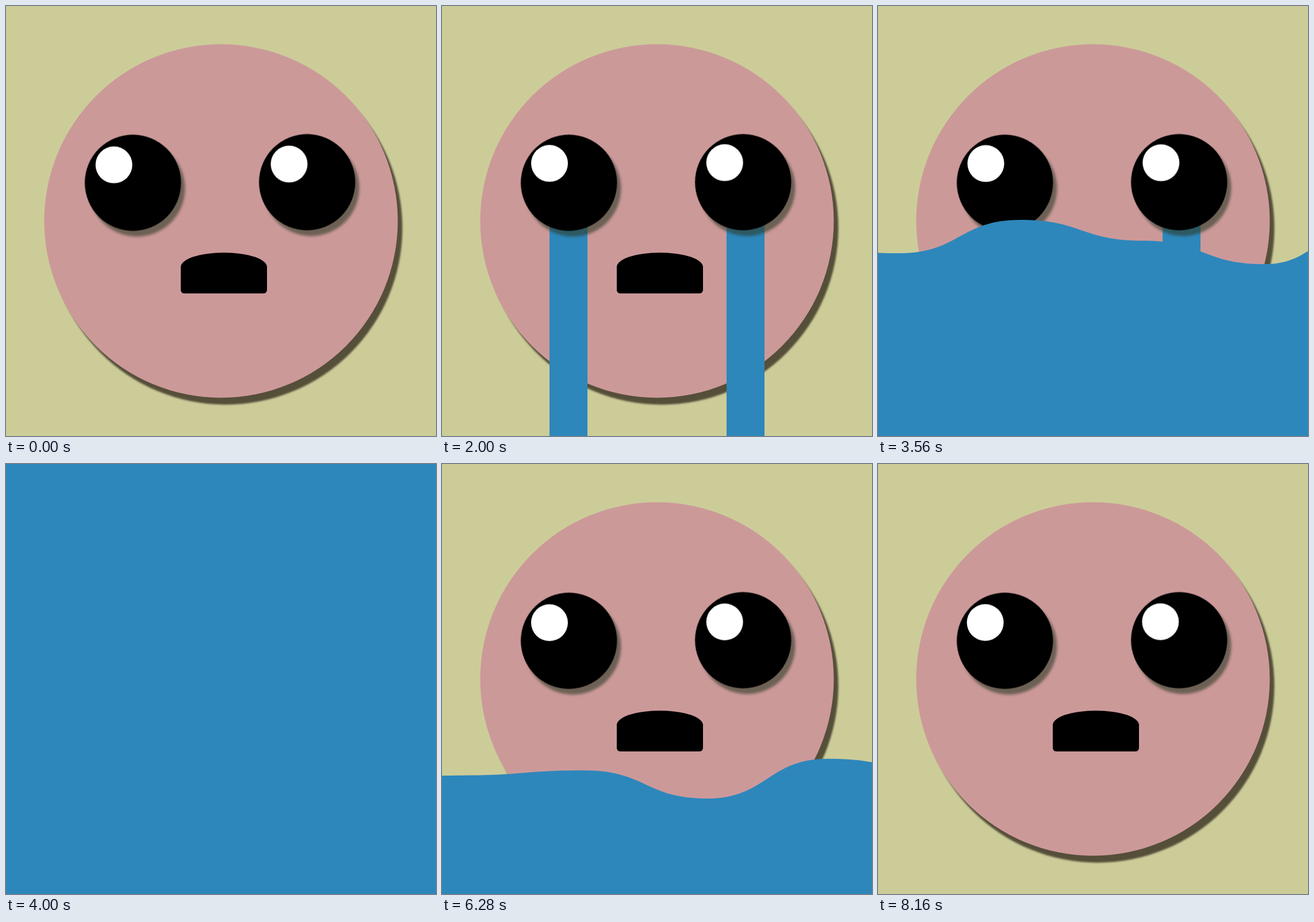
These frames come from a looping animation (748x748 px, 8.2 s). An HTML page:

```html
<!DOCTYPE html>
<html lang="en">
<head>
<meta charset="utf-8">
<title>Flood of tears</title>
<style>
  html, body { margin: 0; width: 100%; height: 100%; overflow: hidden; background: #cc9; }
  svg { display: block; width: 100vw; height: 100vh; }

  .face { fill: #c99; filter: drop-shadow(8px 12.5px 1.8px #554e39); }
  .water, .tear { fill: #2d87bb; }
  .glint { fill: #fff; }

  .ball {
    filter: drop-shadow(7px 10.5px 2.2px rgba(45, 58, 38, .6));
    animation: blink 8200ms infinite;
  }
  .lid { animation: hide 8200ms infinite; }
  .glint {
    animation:
      sway calc(8200ms / 46) cubic-bezier(.364, 0, .636, 1) -80ms infinite alternate,
      bob calc(8200ms / 22) cubic-bezier(.364, 0, .636, 1) -224ms infinite alternate;
  }
  .tear { animation: cry 8200ms linear infinite; }

  @keyframes blink {
    0%, 8% { ry: 83.7px; animation-timing-function: ease-in-out; }
    13.2%, 14.2% { ry: 14px; animation-timing-function: ease-in-out; }
    19.5%, 100% { ry: 83.7px; }
  }
  @keyframes hide {
    0%, 8% { transform: scaleY(1); animation-timing-function: ease-in-out; }
    13.2%, 14.2% { transform: scaleY(0); animation-timing-function: ease-in-out; }
    19.5%, 100% { transform: scaleY(1); }
  }
  @keyframes sway { from { cx: -33.9px; } to { cx: -30.1px; } }
  @keyframes bob { from { cy: -33.9px; } to { cy: -30.1px; } }
  @keyframes cry {
    0%, 8.5% { transform: translateY(300px); }
    13.66% { transform: translateY(357px); animation-timing-function: cubic-bezier(.5, .25, .8, .6); }
    20.49% { transform: translateY(485px); animation-timing-function: cubic-bezier(.4, .2, .8, .6); }
    24.3%, 58% { transform: translateY(800px); }
    58.01%, 100% { transform: translateY(300px); }
  }
</style>
</head>
<body>
<svg viewBox="0 0 748 748">
  <clipPath id="stream"><rect x="-32.7" y="307" width="65.5" height="441"/></clipPath>

  <circle class="face" cx="374" cy="374" r="307.5"/>
  <path d="M304 454A75 25 0 0 1 454 454V494A6 6 0 0 1 448 500H310A6 6 0 0 1 304 494Z"/>

  <g transform="translate(220)" clip-path="url(#stream)">
    <path class="tear" d="M-38-900V-33A36 33 0 0 0 34-33V-900Z"/>
  </g>
  <g transform="translate(528)" clip-path="url(#stream)">
    <path class="tear" d="M-38-900V-33A36 33 0 0 0 34-33V-900Z"/>
  </g>

  <g transform="translate(220.7 307.5)">
    <ellipse class="ball" rx="83.7" ry="83.7"/>
    <g transform="translate(-.7 .2)"><g class="lid"><circle class="glint" r="32"/></g></g>
  </g>
  <g transform="translate(523.8 306.5)">
    <ellipse class="ball" rx="83.7" ry="83.7"/>
    <g transform="translate(.9 -.1)"><g class="lid"><circle class="glint" r="32"/></g></g>
  </g>

  <path class="water"/>
</svg>
<script>
  const water = document.querySelector('.water');
  const LOOP = 8200, STEP = 212, LEFT = -176;

  // Cosine and sine weight of each wave knot
  const knots = [[8, 23], [28, 23], [-30, -36.5], [6, 57], [47, 1], [-49, -46]];

  // Mean water line: floods in, then drains faster and faster
  function level(t) {
    if (t < 4780) {
      const d = t - 3560;
      return 403 - .972 * d - .00021 * d * d;
    }
    const d = t - 5560;
    return -46 + .455 * d + .0005 * d * d;
  }

  function wave(t) {
    const a = (t - 3560) / 2000 * 2 * Math.PI;
    const base = level(t);
    const ys = knots.map(([c, s]) => base + c * Math.cos(a) + s * Math.sin(a));
    let d = `M${LEFT} ${ys[0]}`;
    for (let i = 1; i < ys.length; i++) {
      const x = LEFT + i * STEP, mid = x - STEP / 2;
      d += `C${mid} ${ys[i - 1]} ${mid} ${ys[i]} ${x} ${ys[i]}`;
    }
    return d + `V2000H${LEFT}Z`;
  }

  function draw() {
    water.setAttribute('d', wave(performance.now() % LOOP));
    requestAnimationFrame(draw);
  }
  draw();
</script>
</body>
</html>
```
